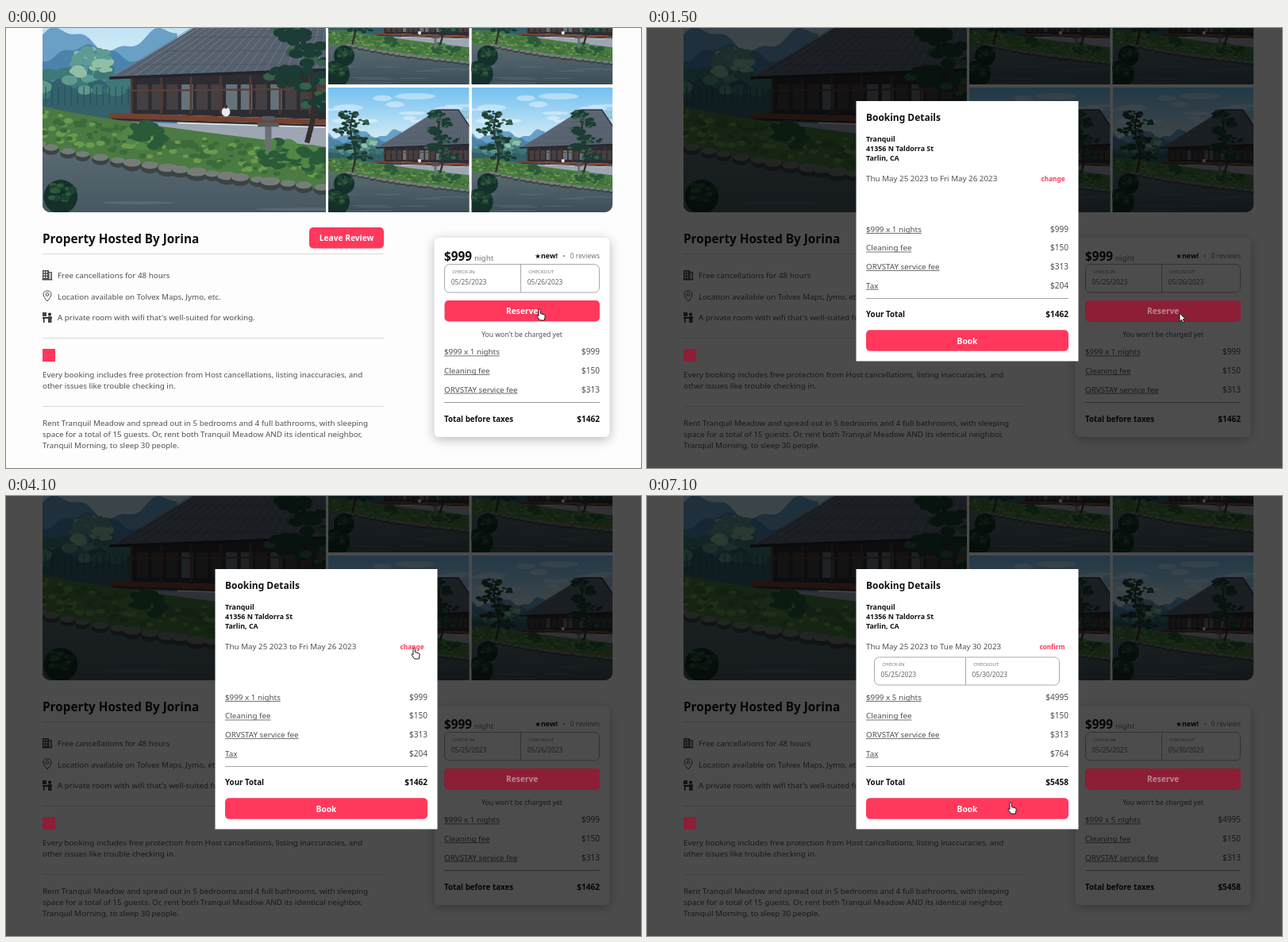
Animation of 800 by 554 pixels, one loop 7200 ms. Source, as an HTML page with a canvas:

```html
<!DOCTYPE html>
<html lang="en">
<head>
<meta charset="utf-8">
<title>Booking flow</title>
<style>
html, body { margin: 0; width: 100%; height: 100%; overflow: hidden; background: #fefdfe; }
canvas { display: block; width: 800px; height: 554px; }
</style>
</head>
<body>
<canvas id="stage" width="800" height="554"></canvas>
<script>
const ctx = document.getElementById('stage').getContext('2d');
const LOOP = 7200, STEP = 100;
const OPEN = 1500, EDIT = 4300, PICKER = 5000, PICKED = 6400;
const PINK = '#ff385c', DIM_PINK = '#8c1f36', INK = '#505050', BLACK = '#111';
const BODY = 9.82, SMALL = 8.6, TINY = 6.15, BOLD = 700;

let seed = 1;
const rnd = () => (seed = seed * 16807 % 2147483647) / 2147483647;
const ease = p => p * p * (3 - 2 * p);

function text(str, x, y, size = BODY, weight = 400, color = INK, align = 'left') {
  ctx.font = `${weight} ${size}px "Noto Sans", "Open Sans", sans-serif`;
  ctx.fillStyle = color;
  ctx.textAlign = align;
  ctx.fillText(str, x, y);
  return ctx.measureText(str).width;
}

function rect(x, y, w, h, fill) {
  ctx.fillStyle = fill;
  ctx.fillRect(x, y, w, h);
}

function round(x, y, w, h, r, fill, stroke, width = 1) {
  ctx.beginPath();
  ctx.roundRect(x, y, w, h, r);
  if (fill) { ctx.fillStyle = fill; ctx.fill(); }
  if (stroke) { ctx.strokeStyle = stroke; ctx.lineWidth = width; ctx.stroke(); }
}

function line(color, width, ...p) {
  ctx.beginPath();
  for (let i = 0; i < p.length; i += 2) ctx.lineTo(p[i], p[i + 1]);
  ctx.strokeStyle = color;
  ctx.lineWidth = width;
  ctx.stroke();
}

function oval(x, y, rx, ry, fill) {
  ctx.beginPath();
  ctx.ellipse(x, y, rx, ry, 0, 0, 7);
  ctx.fillStyle = fill;
  ctx.fill();
}

// Fills the band between two curves of x
function area(fill, x0, x1, top, bottom) {
  ctx.beginPath();
  for (let x = x0; x <= x1; x++) ctx.lineTo(x, top(x));
  for (let x = x1; x >= x0; x--) ctx.lineTo(x, bottom(x));
  ctx.fillStyle = fill;
  ctx.fill();
}

function fade(y0, y1, top, bottom) {
  const g = ctx.createLinearGradient(0, y0, 0, y1);
  g.addColorStop(0, top);
  g.addColorStop(1, bottom);
  return g;
}

function leaves(x, y, w, h, n, dark, light) {
  for (let i = 0; i < n; i++) {
    const a = rnd() * 6.3, d = Math.sqrt(rnd()) / 2, r = (0.06 + rnd() * 0.08) * Math.min(w, h * 2);
    oval(x + Math.cos(a) * d * w, y + Math.sin(a) * d * h, r * 1.3, r * 0.8, rnd() < 0.65 ? dark : light);
  }
}

function bush(x, y, r) {
  oval(x, y, r, r, '#14302a');
  leaves(x, y - r * 0.3, r * 1.5, r, 24, '#1d4030', '#2e5a3c');
}

function pine(x, top, base) {
  const bend = y => x + 3 * Math.sin(y / 11);
  area('#2f2f31', top, base, y => y, y => y);
  for (let y = top; y < base; y += 3) line('#332f2f', 2.4, bend(y), y, bend(y + 3.5), y + 3.5);
  for (let i = 0; i < 6; i++) {
    const y = top + i * 10.5;
    leaves(bend(y) + (i % 2 ? 7 : -6), y, 20 + rnd() * 14, 10, 26, '#1b3c34', '#375f4a');
  }
}

const along = x => Math.max(0, (x - 28) / 134);
const shore = x => 107.5 + 20.6 * Math.pow(along(x), 0.75);
const lawn = x => 89 + 19.5 * Math.pow(along(x), 0.8);
const roof = x => 76 - 48 * Math.min(1, Math.pow((x - 60) / 78, 1.05)) + 1.5 * Math.max(0, x - 164);
const eave = x => 76 - 0.04 * (x - 60);
const deck = x => 92.5 + 0.03 * (x - 60);

function house() {
  area('#56606e', 60, 178, roof, eave);
  for (let i = 0; i < 26; i++) line('#747f8b', 0.35, 137 + i * 1.6, 29, 62 + i * 5, 75);
  for (let i = 1; i < 7; i++) line('#485260', 0.25, 66 + i * 10, 76 - i * 6.4, 178, 76 - i * 6.4);
  line('#303743', 1.6, 137, 28, 164, 28, 178, 49);
  area('#2d2c32', 70, 178, eave, deck);
  for (let x = 73; x < 178; x += 7) rect(x, 79, 5.4, 12, rnd() < 0.35 ? '#66727a' : '#443f42');
  for (let x = 70; x < 178; x += 14) rect(x, 75, 1, 18, '#54392f');
  line('#5b3f36', 0.8, 70, 82, 178, 81);
  line('#22252c', 1.3, 60, 76, 178, 71.5);
  area('#74422f', 60, 178, deck, x => deck(x) + 2.5);
  line('#3c2928', 1, 61, 95.4, 178, 99);
}

function garden(x, y, scale, treeX, close) {
  seed = 11;
  ctx.save();
  ctx.translate(x, y);
  ctx.scale(scale, scale);
  const floor = () => 158;
  rect(0, 0, 178, 158, fade(0, 68, '#74c0f0', '#d6edf6'));
  for (let i = 0; i < 14; i++) oval(rnd() * 178, 10 + rnd() * 40, 8 + rnd() * 18, 1.5 + rnd() * 3, 'rgba(255,255,255,.4)');
  area('#6a9fc6', 0, 92, v => 58 - 5 * Math.cos((v - 37) / 8) - 1.5 * Math.cos(v / 2.6), floor);
  area('#4b83ab', 0, 92, v => 65 - 4 * Math.cos((v - 50) / 9) - Math.cos(v / 2), floor);
  area('#33626c', 0, 80, v => 77 + Math.sin(v), floor);
  leaves(38, 78, 70, 14, 40, '#3f7878', '#5f9a8c');
  leaves(52, 69, 19, 15, 40, '#5f9a94', '#8fbfa6');
  for (let v = 0; v < 72; v += 3) line('#294e5a', 0.4, v, 80, v, 89);
  house();
  area('#9ea6b4', 64, 178, v => deck(v) + 4, floor);
  oval(115, 92, 2, 2.2, '#eceaf0');
  oval(115, 89.5, 0.8, 1, '#3f3433');
  area('#4b7a43', 0, 178, lawn, floor);
  for (let v = 4; v < 178; v += 6)
    leaves(v, lawn(v) + 9, 13, 14, 9, '#3c6b3a', '#6a9a4e');
  area(fade(105, 158, '#5b6c74', '#3c4d58'), 0, 178, shore, floor);
  for (let i = 0; i < 9; i++) oval(rnd() * 178, 134 + rnd() * 22, 14 + rnd() * 16, 0.7, 'rgba(130,155,168,.25)');
  for (let v = 26; v < 180; v += 6 + rnd() * 3) {
    const w = 3.6 + rnd() * 1.8, h = w * 0.62;
    oval(v, shore(v) + 0.8, w, h, '#3b4444');
    oval(v, shore(v) - 0.4, w * 0.9, h * 0.65, '#767d78');
  }
  for (const v of [75, 140, 156]) leaves(v, lawn(v) + 6, 20, 12, 34, '#2a5a38', '#528647');
  rect(133.5, 97, 3, 13, '#6a7074');
  rect(130, 97, 10, 2, '#525a5e');
  rect(132, 94, 6, 2, '#525a5e');
  pine(treeX, 34, 106);
  if (close) {
    bush(37, 132, 8);
  } else {
    pine(31, 34, 104);
    bush(20, 121, 13);
    bush(10, 144, 17);
  }
  ctx.restore();
}

function tile(x, y, w, h, corners, draw) {
  ctx.save();
  ctx.beginPath();
  ctx.roundRect(x, y, w, h, corners);
  ctx.clip();
  draw();
  ctx.restore();
}

function gallery() {
  tile(46, -86, 357, 318, [0, 0, 0, 10], () => garden(-30, -140, 2.67, 154, true));
  for (let i = 0; i < 4; i++) {
    const x = 406 + i % 2 * 180.7, y = i < 2 ? -86 : 75;
    tile(x, y, 177.4, 157, [0, 0, i === 3 ? 10 : 0, 0], () => garden(x, y, 1, 142, false));
  }
}

function icons() {
  // building
  rect(46, 305, 8, 12, '#4a4a4a');
  for (let i = 0; i < 6; i++) rect(47.3 + i % 2 * 3, 306.5 + (i >> 1) * 3.3, 1.8, 1.8, '#fff');
  round(53.5, 307.5, 4, 9, 0, '#bbb', '#444');
  line('#444', 1, 45.5, 317, 58.5, 317);
  // pin
  ctx.beginPath();
  ctx.moveTo(52, 344);
  ctx.bezierCurveTo(44, 335, 47, 331, 52, 331);
  ctx.bezierCurveTo(57, 331, 60, 335, 52, 344);
  ctx.stroke();
  ctx.beginPath();
  ctx.arc(52, 335.5, 1.9, 0, 7);
  ctx.stroke();
  // desk
  oval(55, 360.5, 2, 2, '#222');
  rect(46, 358, 5, 5, '#444');
  rect(46, 364, 12, 1.8, '#222');
  rect(47, 365, 1.5, 6, '#222');
  rect(53, 363, 4.5, 8, '#444');
}

function button(label, x, y, w, fill = PINK, color = '#fff') {
  round(x, y, w, 26.5, 5, fill);
  text(label, x + w / 2, y + 17.2, 10.2, BOLD, color, 'center');
}

function prices(rows, x, right, y) {
  rows.forEach(([label, price], i) => {
    const base = y + i * 23.6, w = text(label, x, base);
    rect(x, base + 1.2, w, 0.8, INK);
    text(price, right, base, 10.1, 400, INK, 'right');
  });
}

function total(label, price, x, right, y) {
  text(label, x, y, 9.75, BOLD, BLACK);
  text(price, right, y, 10.1, BOLD, BLACK, 'right');
}

function dateBox(x, y, w, h, split, inset, out) {
  round(x, y, w, h, 6, '#fff', '#a9a9a9');
  line('#a9a9a9', 1, split, y, split, y + h);
  [['CHECK-IN', '05/25/2023', x], ['CHECKOUT', out, split]].forEach(([label, date, left]) => {
    text(label, left + 9.7, y + 11, TINY, 400, '#777');
    text(date, left + inset, y + 25.2, 8.4, 400, '#666');
  });
}

const reserve = (fill, color) => button('Reserve', 552.5, 343, 195.5, fill, color);
const badge = fill => rect(46, 404, 16, 16, fill);

const fees = s => [
  [`$999 x ${s.nights} nights`, '$' + s.nights * 999],
  ['Cleaning fee', '$150'],
  ['ORVSTAY service fee', '$313']
];

function card(s) {
  ctx.save();
  ctx.shadowColor = 'rgba(0,0,0,.28)';
  ctx.shadowBlur = 14;
  ctx.shadowOffsetY = 3;
  round(539.5, 264, 221, 251, 6, '#fff');
  ctx.restore();
  text('$999', 552, 293, 15.3, BOLD, BLACK);
  text('night', 590, 293, BODY, 400, '#777');
  text('★', 666.5, 290.3, 7.5, BOLD, BLACK);
  text('new!', 674, 290.3, 8.9, BOLD, BLACK);
  text('·', 703, 290.5, 10, BOLD, INK, 'center');
  text('0 reviews', 748, 290.3, SMALL, 400, '#777', 'right');
  dateBox(552.5, 297.5, 195, 35.5, 648.5, 8.3, s.out);
  reserve();
  text("You won't be charged yet", 650, 388.8, SMALL, 400, INK, 'center');
  prices(fees(s), 552, 748, 411.3);
  line('#999', 1, 552, 471.5, 748, 471.5);
  total('Total before taxes', s.total, 552, 748, 495.6);
}

function page(s) {
  rect(0, 0, 800, 554, '#fefdfe');
  gallery();
  text('Property Hosted By Jorina', 46, 270.5, 15.3, BOLD, BLACK);
  button('Leave Review', 382, 251, 94);
  for (const y of [284.5, 390.5, 476.5]) line('#d9d9d9', 1, 46, y, 476, y);
  icons();
  ['Free cancellations for 48 hours',
    'Location available on Tolvex Maps, Jymo, etc.',
    "A private room with wifi that's well-suited for working."
  ].forEach((row, i) => text(row, 65, 314.6 + i * 26.9));
  badge(PINK);
  ['Every booking includes free protection from Host cancellations, listing inaccuracies, and',
    'other issues like trouble checking in.'
  ].forEach((row, i) => text(row, 46, 440 + i * 14));
  ['Rent Tranquil Meadow and spread out in 5 bedrooms and 4 full bathrooms, with sleeping',
    'space for a total of 15 guests. Or, rent both Tranquil Meadow AND its identical neighbor,',
    'Tranquil Morning, to sleep 30 people.'
  ].forEach((row, i) => text(row, 46, 500.5 + i * 14));
  card(s);
}

function modal(s) {
  rect(0, 0, 800, 554, 'rgba(0,0,0,.7)');
  reserve(DIM_PINK, '#b98792');
  badge(DIM_PINK);
  rect(263.5, 92, 280, 327.5, '#fff');
  text('Booking Details', 276, 117.2, 11.95, BOLD, BLACK);
  ['Tranquil', '41356 N Taldorra St', 'Tarlin, CA']
    .forEach((row, i) => text(row, 276, 142.8 + i * 12.1, 8.9, BOLD, BLACK));
  text(`Thu May 25 2023 to ${s.until} 2023`, 276, 193.2);
  text(s.editing ? 'confirm' : 'change', 526.5, 193, 8.2, BOLD, PINK, 'right');
  if (s.editing) dateBox(286.5, 203, 233, 35, 401.5, 8, s.out);
  prices([...fees(s), ['Tax', s.tax]], 276, 531, 256.8);
  line('#a5a5a5', 1, 276, 340.5, 531, 340.5);
  total('Your Total', s.total, 276, 531, 364.3);
  button('Book', 276, 380.3, 255);
  if (s.picking) picker();
}

function picker() {
  const pitch = 20.7, left = 422.5, mid = 484.7;
  round(408, 218, 66, 13.5, 2, null, BLACK, 2);
  line('#222', 0.8, 434.5, 219.5, 434.5, 230);
  round(408, 238, 153.5, 151, 3, '#fff', '#aeaeae');
  round(408.5, 238.5, 152.5, 38.5, [3, 3, 0, 0], '#f0f0f0');
  area('#f0f0f0', 453, 465, x => 233 + Math.abs(x - 459), () => 239);
  line('#aeaeae', 0.8, 453, 238, 459, 233, 465, 238);
  line('#aeaeae', 0.8, 408, 277, 561.5, 277);
  for (const side of [-1, 1]) {
    const x = mid + side * 62.3;
    line('#c8c8c8', 2, x, 244.5, x + side * 5, 249.5, x, 254.5);
  }
  text('May 2023', mid, 253.4, 9.6, BOLD, BLACK, 'center');
  ['Su', 'Mo', 'Tu', 'We', 'Th', 'Fr', 'Sa']
    .forEach((d, i) => text(d, left + i * pitch, 269.5, 7.9, 400, INK, 'center'));
  for (let i = 0; i < 35; i++) {
    const day = new Date(2023, 3, 30 + i).getDate();
    const x = left + i % 7 * pitch, y = 292 + Math.floor(i / 7) * 20.5;
    if (day === 26) round(x - 8.8, y - 8.7, 17.6, 17.4, 3, '#2a6795');
    text(day, x, y + 3, 8.1, day === 25 ? BOLD : 400, day === 26 ? '#fff' : day === 25 ? BLACK : INK, 'center');
  }
}

const SHAPES = {
  hand: new Path2D('M0 1.3Q0 0 1.2 0T2.4 1.3V5.6L7 6.8Q8.4 7.3 8.2 9L7.3 14H1.6L-1.8 9.3Q-2.4 8-1.2 7.7L0 8.8Z'),
  arrow: new Path2D('M0 0V10.5L2.4 8.3L4 12L5.8 11.2L4.2 7.7H7.4Z'),
  beam: new Path2D('M-2 0H2M0 0V11M-2 11H2')
};

// Key points: time, x, y, shape from then on
const POINTER = [
  [0, 671, 354, 'hand'], [OPEN, 671, 359, 'arrow'], [2700, 671, 359, 'arrow'],
  [3600, 513, 191, 'hand'], [4400, 513, 191, 'arrow'], [4900, 436, 224, 'beam'],
  [5100, 436, 224, 'arrow'], [5400, 500, 272, 'arrow'], [6100, 464, 371, 'hand'],
  [6500, 464, 371, 'hand'], [7000, 457, 386, 'hand'], [LOOP, 457, 386, 'hand']
];

function pointer(t) {
  const next = POINTER.findIndex(k => k[0] > t);
  const [t0, x0, y0, shape] = POINTER[next - 1], [t1, x1, y1] = POINTER[next];
  const p = ease((t - t0) / (t1 - t0));
  ctx.save();
  ctx.translate(x0 + (x1 - x0) * p, y0 + (y1 - y0) * p);
  ctx.lineJoin = 'round';
  ctx.lineWidth = 1;
  ctx.strokeStyle = '#1a1a1a';
  ctx.fillStyle = '#fff';
  ctx.fill(SHAPES[shape]);
  ctx.stroke(SHAPES[shape]);
  ctx.restore();
}

function stateAt(t) {
  const booking = t >= PICKED
    ? { nights: 5, out: '05/30/2023', until: 'Tue May 30', tax: '$764', total: '$5458' }
    : { nights: 1, out: '05/26/2023', until: 'Fri May 26', tax: '$204', total: '$1462' };
  return { ...booking, editing: t >= EDIT, picking: t >= PICKER && t < PICKED };
}

let shown = -1;
function frame() {
  const t = Math.floor(performance.now() % LOOP / STEP) * STEP;
  if (t !== shown) {
    shown = t;
    const s = stateAt(t);
    page(s);
    if (t >= OPEN) modal(s);
    pointer(t);
  }
  requestAnimationFrame(frame);
}
frame();
</script>
</body>
</html>
```
